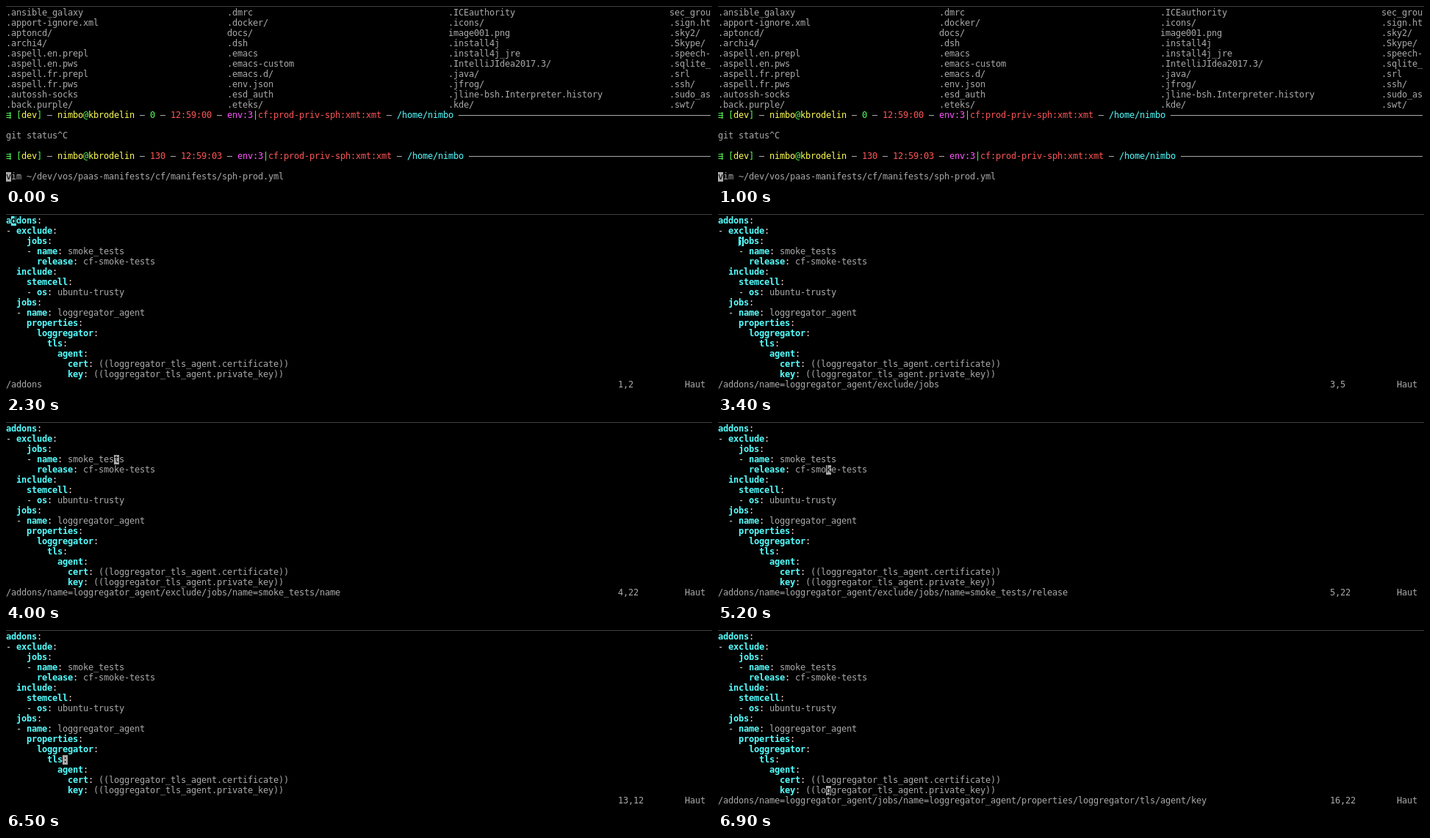
These frames come from a looping animation (961x246 px, 8 s). An HTML page:

```html
<!DOCTYPE html>
<html lang="en">
<head>
<meta charset="utf-8">
<title>Terminal session</title>
<style>
  html, body { margin: 0; width: 100%; height: 100%; overflow: hidden; background: #000; }
  body {
    position: relative;
    color: #aaa;
    font: 12px/14px "DejaVu Sans Mono", monospace;
    letter-spacing: calc(7px - 1ch);
    font-variant-ligatures: none;
  }
  #edge { position: absolute; top: 0; left: 0; width: 100%; height: 1px; background: #404040; }
  .row { position: absolute; left: 0; height: 14px; white-space: pre; }
  .green { color: #5f5; }
  .yellow { color: #ff5; }
  .red { color: #f55; }
  .magenta { color: #f5f; }
  .cyan { color: #5ff; }
  .key { color: #5ff; font-weight: bold; }
  .colon { color: #ffd7d7; }
  .dash { color: #ddd; }
  .rule {
    display: inline-block; height: 14px; vertical-align: top;
    background: linear-gradient(#aaa, #aaa) 0 7px / 100% 1px no-repeat;
  }
  .arrow { display: inline-block; width: 7px; height: 14px; vertical-align: top; }
  .cursor {
    position: absolute; width: 7px; height: 14px; white-space: pre; color: #000;
    background: linear-gradient(#aaa, #aaa) 0 1px / 7px 13px no-repeat;
  }
  .cursor.key { color: #000; background-image: linear-gradient(#5ff, #5ff); }
</style>
</head>
<body>
<div id="edge"></div>
<div id="shell"></div>
<div id="editor"></div>
<script>
const CELL = 7, LINE = 14, TOP = 2, LOOP = 8000, OPEN = 1300;
const shell = document.getElementById('shell');
const editor = document.getElementById('editor');

function place(el, row, col) {
  el.style.left = col * CELL + 'px';
  el.style.top = TOP + row * LINE + 'px';
}

function addRow(parent, row, col, html) {
  const el = document.createElement('div');
  el.className = 'row';
  el.innerHTML = html;
  place(el, row, col);
  parent.append(el);
  return el;
}

function addCursor(parent) {
  const el = document.createElement('div');
  el.className = 'cursor';
  parent.append(el);
  return el;
}

const paint = (cls, text) => `<span class="${cls}">${text}</span>`;
const rule = n => `<span class="rule" style="width:${n * CELL}px"></span>`;

// Shell screen
const listing = [
  [0, '.ansible_galaxy .apport-ignore.xml .aptoncd/ .archi4/ .aspell.en.prepl .aspell.en.pws .aspell.fr.prepl .aspell.fr.pws .autossh-socks .back.purple/'],
  [43, '.dmrc .docker/ docs/ .dsh .emacs .emacs-custom .emacs.d/ .env.json .esd_auth .eteks/'],
  [86, '.ICEauthority .icons/ image001.png .install4j .install4j_jre .IntelliJIdea2017.3/ .java/ .jfrog/ .jline-bsh.Interpreter.history .kde/'],
  [129, 'sec_grou .sign.ht .sky2/ .Skype/ .speech- .sqlite_ .srl .ssh/ .sudo_as .swt/']
];
for (const [col, names] of listing)
  names.split(' ').forEach((name, row) => addRow(shell, row, col, name));

function prompt(row, code, cls, time, fill) {
  const parts = [
    paint('arrow green', '⇶') + ' ' + paint('green', '[') + paint('yellow', 'dev') + paint('green', ']'),
    paint('yellow', 'nimbo') + paint('green', '@') + paint('yellow', 'kbrodelin'),
    paint(cls, code),
    paint('red', time),
    paint('magenta', 'env:3') + paint('green', '|') + paint('red', 'cf:prod-priv-sph:xmt:xmt'),
    paint('cyan', '/home/nimbo')
  ];
  return addRow(shell, row, 0, parts.join(` ${rule(1)} `) + ' ' + rule(fill));
}
prompt(10, '0', 'green', '12:59:00', 49);
addRow(shell, 12, 0, 'git status^C');
const blink = prompt(14, '130', 'red code', '12:59:03', 47).querySelector('.code');
addRow(shell, 16, 0, 'vim ~/dev/vos/paas-manifests/cf/manifests/sph-prod.yml');
const shellCursor = addCursor(shell);
shellCursor.textContent = 'v';
place(shellCursor, 16, 0);

// Editor screen
const yaml = `addons:
- exclude:
    jobs:
    - name: smoke_tests
      release: cf-smoke-tests
  include:
    stemcell:
    - os: ubuntu-trusty
  jobs:
  - name: loggregator_agent
    properties:
      loggregator:
        tls:
          agent:
            cert: ((loggregator_tls_agent.certificate))
            key: ((loggregator_tls_agent.private_key))`.split('\n');

yaml.forEach((line, row) => {
  const [, pad, item, key, value] = line.match(/^( *)(- )?(\w+):(.*)$/);
  addRow(editor, row, 0,
    pad + (item ? paint('dash', item) : '') + paint('key', key) + paint('colon', ':') + value);
});

const addon = '/addons/name=loggregator_agent';
const tests = addon + '/exclude/jobs/name=smoke_tests';
const agent = addon + '/jobs/name=loggregator_agent';
const tls = agent + '/properties/loggregator/tls/agent';
const paths = {
  1: '/addons',
  2: addon + '/exclude',
  3: addon + '/exclude/jobs',
  4: tests + '/name',
  5: tests + '/release',
  8: addon + '/include/stemcell/0/os',
  10: agent + '/name',
  15: tls + '/cert',
  16: tls + '/key'
};

// Cursor moves: time, line, column
const moves = [
  [1300, 1, 1], [2300, 1, 2], [2400, 1, 3], [2800, 2, 4], [3100, 3, 4], [3400, 3, 5],
  [3700, 4, 5], [3900, 4, 13], [4000, 4, 22], [5200, 5, 22], [5400, 6, 22], [5500, 7, 22],
  [5600, 8, 22], [5800, 9, 22], [5900, 10, 22], [6100, 11, 22], [6400, 12, 22],
  [6500, 13, 22], [6600, 14, 22], [6800, 15, 22], [6900, 16, 22]
];

const status = addRow(editor, 16, 0, '');
const ruler = addRow(editor, 16, 119, '');
addRow(editor, 16, 132, 'Haut');
const cursor = addCursor(editor);

function moveTo(line, wanted) {
  const text = yaml[line - 1];
  const col = Math.min(wanted, text.length);
  const ch = text[col - 1];
  const inKey = col <= text.indexOf(':') && /\w/.test(ch);
  cursor.className = inKey ? 'cursor key' : 'cursor';
  cursor.textContent = ch;
  place(cursor, line - 1, col - 1);
  status.textContent = /[:-]/.test(ch) ? '' : paths[line];
  ruler.textContent = line + ',' + col;
}

let shown = null;
function draw(t) {
  const inShell = t < OPEN;
  shell.style.display = inShell ? '' : 'none';
  editor.style.display = inShell ? 'none' : '';
  blink.style.visibility = t >= 500 && t < 1000 ? 'hidden' : '';
  const move = moves.findLast(m => m[0] <= t);
  if (move && move !== shown) moveTo(move[1], move[2]);
  shown = move;
}

const start = performance.now();
function tick() {
  draw((performance.now() - start) % LOOP);
  requestAnimationFrame(tick);
}
tick();
</script>
</body>
</html>
```
